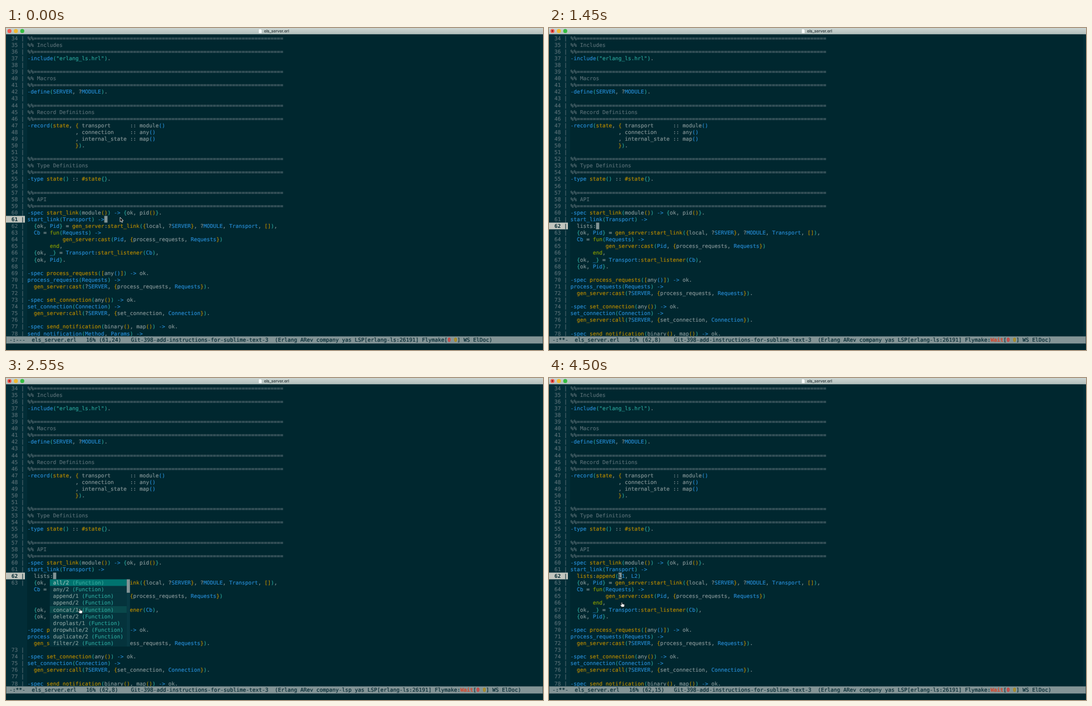
An HTML page for the animation above (4.55 s loop, 965 by 580 pixels).

```html
<!DOCTYPE html>
<html lang="en">
<head>
<meta charset="utf-8">
<title>els_server.erl</title>
<style>
html, body { margin: 0; width: 100%; height: 100%; overflow: hidden; background: #00272f; }
svg { display: block; }
text { font: 9.56px "DejaVu Sans Mono", monospace; white-space: pre; text-rendering: geometricPrecision; stroke-width: 0.18px; }
</style>
</head>
<body>
<svg id="stage" width="965" height="580" viewBox="0 0 965 580"></svg>
<script>
const LOOP = 4550, CH = 5.7556, LH = 12.09, LEFT = 38.5, TOP = 12, FIRST = 34;
const C = {
  bg: '#00272f', fringe: '#022d37', panel: '#05333c', ink: '#052a33',
  dim: '#586e75', text: '#839496', blue: '#268bd2', cyan: '#2aa198',
  yellow: '#b58900', green: '#859900', violet: '#6c71c4', red: '#dc322f'
};
const RULE = '%%' + '='.repeat(78);
const heading = name => [RULE, '%% ' + name, RULE];

const head = [
  ...heading('Includes'),
  '-include("erlang_ls.hrl").', '',
  ...heading('Macros'),
  '-define(SERVER, ?MODULE).', '',
  ...heading('Record Definitions'),
  '-record(state, { transport      :: module()',
  '               , connection     :: any()',
  '               , internal_state :: map()',
  '               }).', '',
  ...heading('Type Definitions'),
  '-type state() :: #state{}.', '',
  ...heading('API'),
  '-spec start_link(module()) -> {ok, pid()}.',
  'start_link(Transport) ->'
];
const tail = [
  '  {ok, Pid} = gen_server:start_link({local, ?SERVER}, ?MODULE, Transport, []),',
  '  Cb = fun(Requests) ->',
  '           gen_server:cast(Pid, {process_requests, Requests})',
  '       end,',
  '  {ok, _} = Transport:start_listener(Cb),',
  '  {ok, Pid}.', '',
  '-spec process_requests([any()]) -> ok.',
  'process_requests(Requests) ->',
  '  gen_server:cast(?SERVER, {process_requests, Requests}).', '',
  '-spec set_connection(any()) -> ok.',
  'set_connection(Connection) ->',
  '  gen_server:call(?SERVER, {set_connection, Connection}).', '',
  '-spec send_notification(binary(), map()) -> ok.',
  'send_notification(Method, Params) ->'
];
const items = ['all/2', 'any/2', 'append/1', 'append/2', 'concat/1', 'delete/2',
  'droplast/1', 'dropwhile/2', 'duplicate/2', 'filter/2'];

const svg = document.getElementById('stage');
function add(parent, tag, attrs, content) {
  const el = document.createElementNS('http://www.w3.org/2000/svg', tag);
  for (const k in attrs) el.setAttribute(k, attrs[k]);
  if (content !== undefined) el.textContent = content;
  parent.appendChild(el);
  return el;
}
const rect = (p, x, y, width, height, fill) => add(p, 'rect', { x, y, width, height, fill });
const label = (p, x, y, fill, s) => add(p, 'text', { x, y, fill, stroke: fill }, s);
const show = (el, on) => el.setAttribute('visibility', on ? 'visible' : 'hidden');
const rowTop = line => TOP + (line - FIRST) * LH;
const baseline = line => rowTop(line) + 9.6;
const colX = col => LEFT + col * CH;

// Syntax colours; bracket depth carries over between lines.
let depth = 0;
const rainbow = [C.cyan, C.yellow, C.blue, C.violet];
const types = /^(module|any|map|pid|binary)$/;
function paint(line) {
  if (line.startsWith('%%')) return [[0, line, C.dim]];
  const out = [];
  const re = /"[^"]*"|->|::|^-[a-z]+|#?[a-z]\w*|[A-Z_]\w*|[()[\]{}]|[^\s\w]/g;
  for (let m; (m = re.exec(line));) {
    const s = m[0], after = line[re.lastIndex];
    let color = C.text;
    if (s[0] === '"') color = C.cyan;
    else if (s === '->' || /^-[a-z]/.test(s) || /^[A-Z_]/.test(s)) color = C.blue;
    else if (/[([{]/.test(s)) color = rainbow[depth++ % 4];
    else if (/[)\]}]/.test(s)) color = rainbow[--depth % 4];
    else if (s === 'fun' || s === 'end') color = C.green;
    else if (/^#?[a-z]/.test(s)) {
      if (m.index === 0) color = C.blue;
      else if (s[0] === '#' || line.startsWith('-record(' + s) ||
        (after === '(' && !types.test(s)) || after === ':') color = C.yellow;
    }
    out.push([m.index, s, color]);
  }
  return out;
}
function code(parent, line, n) {
  for (const [col, s, color] of paint(line)) label(parent, colX(col), baseline(n), color, s);
}

rect(svg, 0, 0, 965, 580, C.bg);
rect(svg, 0, 11, 38, 544, C.fringe);
rect(svg, 960, 11, 5, 544, C.fringe);

const numbers = [];
for (let n = FIRST; n <= 78; n++) numbers[n] = label(svg, 9.75, baseline(n), C.dim, n + ' |');
const mark = add(svg, 'g');
rect(mark, 0, rowTop(61), 34, LH, '#c2c5be');
const markText = label(mark, 9.75, baseline(61), C.ink, '');
markText.style.fontWeight = 'bold';
markText.style.strokeWidth = 0;

head.forEach((s, i) => code(svg, s, FIRST + i));
const lower = add(svg, 'g');
tail.forEach((s, i) => code(lower, s, 62 + i));

const typed = label(svg, LEFT, baseline(62), C.text, '');
const filled = add(svg, 'g');
code(filled, '  lists:append(L1, L2)', 62);
const caret = rect(svg, 0, 0, CH, LH, C.text);
const covered = label(svg, colX(15), baseline(62), C.ink, 'L');

// Completion list
const popup = add(svg, 'g');
const popX = colX(7), popY = rowTop(63);
rect(popup, popX, popY, 25 * CH, 10 * LH, C.panel);
const rows = items.map((name, i) => {
  const bg = rect(popup, popX, popY + i * LH, 24 * CH, LH, C.panel);
  label(popup, colX(8), baseline(63 + i), i ? '#839d9b' : '#a0c0ba', name);
  label(popup, colX(9 + name.length), baseline(63 + i), i ? C.cyan : '#35a79c', '(Function)');
  return bg;
});
rect(popup, colX(31), popY, CH, 10 * LH, '#083943');
rect(popup, colX(31), popY, CH, 2 * LH, C.text);

// Mode line
rect(svg, 0, 555, 965, 25, C.bg);
rect(svg, 0, 555, 965, 13.8, '#34525a');
rect(svg, 0.8, 555.8, 963.4, 12.2, C.text);
const status = add(svg, 'text', { x: 6, y: 565.4 });
let lastKey = '';
function setStatus(edited, line, col, listing) {
  const pos = `(${line},${col})`.padEnd(10);
  const key = edited + pos + listing;
  if (key === lastKey) return;
  lastKey = key;
  status.textContent = '';
  const put = (s, fill = C.ink, weight = 'normal') =>
    add(status, 'tspan', { fill, stroke: fill, 'font-weight': weight }, s);
  put(`-:${edited ? '**' : '--'}-  els_server.erl   16% ${pos}` +
    `Git-398-add-instructions-for-sublime-text-3  (Erlang ARev company${listing ? '-lsp' : ''}` +
    ' yas LSP[erlang-ls:26191] Flymake');
  if (edited) {
    put(':');
    put('Wait', '#d5492f', 'bold');
  }
  put('[');
  put('0', C.red, 'bold');
  put(' ');
  put('0', C.yellow, 'bold');
  put('] WS ElDoc)');
}

// Title bar
const grad = add(add(svg, 'defs'), 'linearGradient', { id: 'bar', x2: 0, y2: 1 });
add(grad, 'stop', { offset: 0, 'stop-color': '#ccd5d2' });
add(grad, 'stop', { offset: 1, 'stop-color': '#b3bfbc' });
rect(svg, 0, 0, 965, 11.3, 'url(#bar)');
['#f35b50', '#f0b92f', '#35bd41'].forEach((fill, i) =>
  add(svg, 'circle', { cx: 6.2 + i * 11.5, cy: 5.4, r: 3.6, fill }));
const dot = add(svg, 'circle', { cx: 6.2, cy: 5.4, r: 1.3, fill: '#7c120d' });
add(svg, 'path', { d: 'M454 1.8h3.8l2 2v5.7h-5.8z', fill: '#f7faf9', stroke: '#a3aeab', 'stroke-width': 0.4 });
const title = label(svg, 463.7, 8.2, '#2c383b', 'els_server.erl');
title.style.font = '7.2px Inter, sans-serif';

// Pointers, with the tip at 0,0
const arrow = add(svg, 'path', {
  d: 'M0 0V8.2L1.9 6.5L3.2 9.4L4.6 8.8L3.4 6H5.9Z',
  fill: '#000', stroke: '#fff', 'stroke-width': 0.8
});
const hand = add(svg, 'path', {
  d: 'M-.9 .4Q0 -.6 .8 .4V3L4 3.6Q5 4 4.7 5.4L3.9 8.6H-.4L-3 5.2Q-3 4 -1.9 4.4L-.9 5.1Z',
  fill: '#fff', stroke: '#10181a', 'stroke-width': 0.7
});

const NEWLINE = 100, LIST = 1700, PICK = 3200;
const keys = [[350, '  '], [650, 'l'], [750, 'i'], [850, 's'], [950, 't'], [1050, 's'], [1300, ':']];
const path = [[1700, 205, 341], [1950, 145.5, 354], [2200, 136, 386], [2400, 132.8, 415.5],
  [2750, 132.8, 415.5], [3000, 131, 404]];

function pointer(t) {
  if (t < path[0][0]) return path[0].slice(1);
  for (let i = 1; i < path.length; i++) {
    const [a, ax, ay] = path[i - 1], [b, bx, by] = path[i];
    if (t <= b) {
      const k = (t - a) / (b - a);
      return [ax + (bx - ax) * k, ay + (by - ay) * k];
    }
  }
  return path[path.length - 1].slice(1);
}

function draw(time) {
  const t = Math.floor((time % LOOP) / 50) * 50;
  const edited = t >= NEWLINE, listing = t >= LIST && t < PICK, picked = t >= PICK;
  const text = keys.filter(k => t >= k[0]).map(k => k[1]).join('');
  const line = edited ? 62 : 61;
  const col = !edited ? 24 : picked ? 15 : text.length;

  lower.setAttribute('transform', `translate(0 ${edited ? LH : 0})`);
  typed.textContent = picked ? '' : text;
  show(filled, picked);
  mark.setAttribute('transform', `translate(0 ${(line - 61) * LH})`);
  markText.textContent = line + ' |';
  for (let n = 64; n <= 72; n++) show(numbers[n], !listing);

  const last = Math.max(0, edited ? NEWLINE : 0, ...keys.map(k => k[0]).filter(k => k <= t), picked ? PICK : 0);
  const lit = Math.floor((t - last) / 500) % 2 === 0;
  caret.setAttribute('x', colX(col));
  caret.setAttribute('y', rowTop(line));
  show(caret, lit);
  show(covered, picked && lit);

  const [x, y] = pointer(t);
  const seen = !edited || t >= path[0][0];
  const over = picked || (listing && y >= popY);
  show(popup, listing);
  const hover = over ? Math.floor((y - popY) / LH) : -1;
  rows.forEach((r, i) => r.setAttribute('fill', i === 0 ? '#00736f' : i === hover ? '#0a484b' : C.panel));
  // Children of a group inherit visibility, so only the group is toggled.
  show(arrow, seen && !over);
  show(hand, seen && over);
  for (const p of [arrow, hand]) p.setAttribute('transform', `translate(${x} ${y})`);

  show(dot, edited);
  setStatus(edited, line, col, listing);
}

const start = performance.now();
function tick() {
  draw(performance.now() - start);
  requestAnimationFrame(tick);
}
draw(0);
requestAnimationFrame(tick);
</script>
</body>
</html>
```
